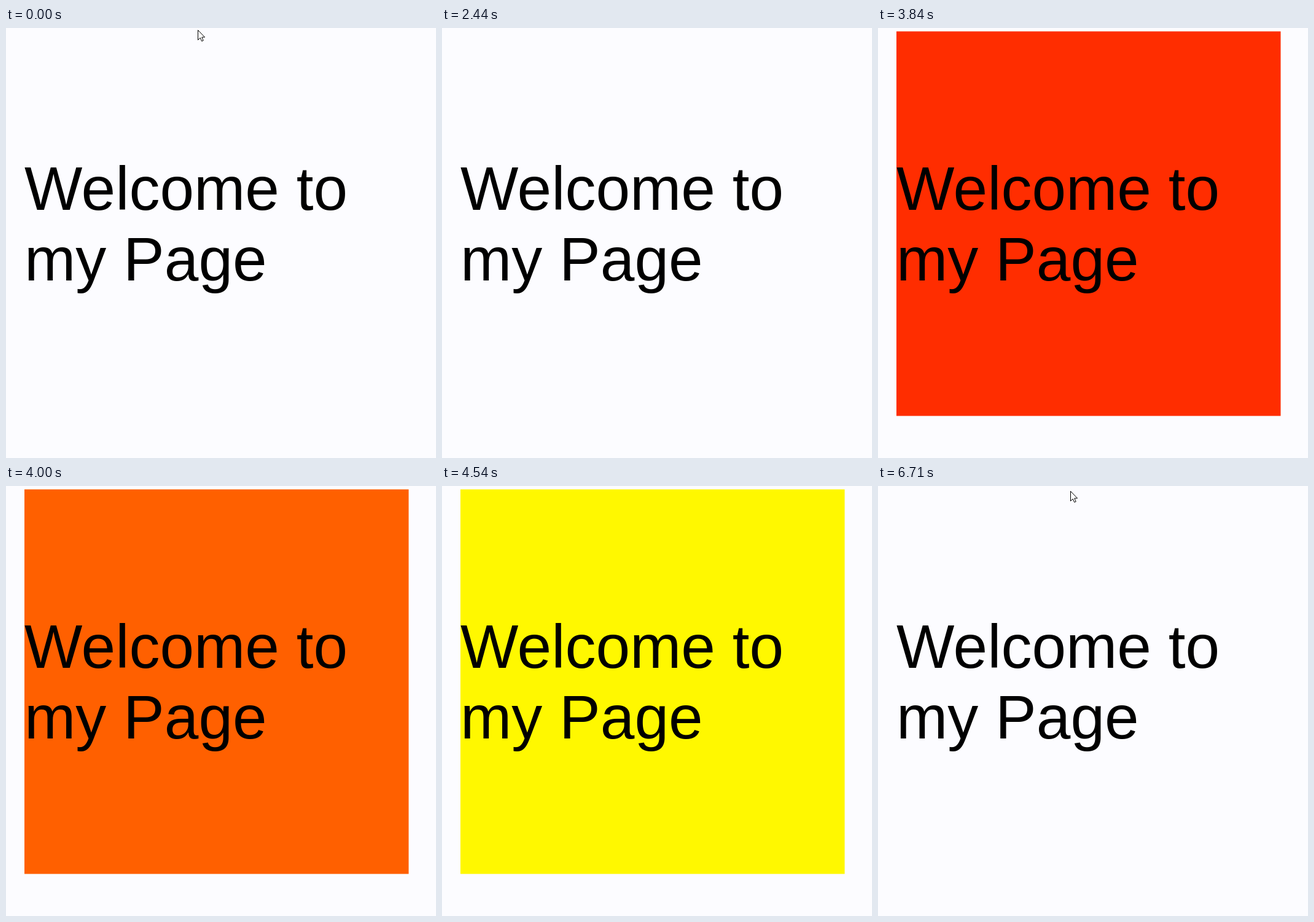
An HTML page for the animation above (6950 ms loop, 700 px wide and 700 px high).

```html
<!DOCTYPE html>
<html lang="en">
<head>
<meta charset="utf-8">
<title>Welcome</title>
<style>
  html, body { margin: 0; width: 100%; height: 100%; overflow: hidden; background: #fcfcff; }
  svg { display: block; width: 100%; height: 100%; }
  text { font: 100px "Liberation Sans", Arial, sans-serif; }
</style>
</head>
<body>
<svg viewBox="0 0 700 700">
  <rect id="box" x="30" y="5.5" width="625.5" height="626" visibility="hidden"/>
  <text x="30" y="296">Welcome to</text>
  <text x="30" y="411">my Page</text>
  <path id="cursor" d="M.5 .5V16.5L4.2 13L6.7 18.5L9.2 17.4L6.8 12H11.6Z"
        fill="#fff" stroke="#000" stroke-width="1"/>
</svg>
<script>
const LOOP = 6950, TICK = 1000 / 30;
const BOX_ON = 3566, BOX_OFF = 5566;
const LEAVE = 740, GONE = 1366, RETURN = 6160, REST = 6700;
const box = document.getElementById("box");
const cursor = document.getElementById("cursor");

const progress = (t, from, to) => Math.min(1, Math.max(0, (t - from) / (to - from)));
const mix = (a, b, k) => a + (b - a) * k;
const easeInOut = p => p * p * (3 - 2 * p);
const easeOut = p => 1 - (1 - p) ** 3;
// Overshoots the end by c-dependent amount, then settles
const easeBack = (p, c = 2.77) => 1 + (c + 1) * (p - 1) ** 3 + c * (p - 1) ** 2;

function show(el, on) {
  el.setAttribute("visibility", on ? "visible" : "hidden");
}

function cursorAt(t) {
  if (t < GONE) {
    const p = progress(t, LEAVE, GONE);
    return [mix(312, 702, p ** 1.6), mix(3, 105, p ** 1.3)];
  }
  const p = progress(t, RETURN, REST);
  return [mix(661, 313, easeBack(p)), mix(127, 8, easeOut(p))];
}

function draw(now) {
  const t = Math.floor((now % LOOP) / TICK) * TICK;

  const green = Math.round(255 * easeInOut(progress(t, 3540, 4640)));
  box.setAttribute("fill", `rgb(255,${green},0)`);
  show(box, t >= BOX_ON && t < BOX_OFF);

  cursor.setAttribute("transform", `translate(${cursorAt(t).map(Math.round)})`);
  show(cursor, t < GONE || t >= RETURN);
}

const start = performance.now();
function frame() {
  draw(performance.now() - start);
  requestAnimationFrame(frame);
}
frame();
</script>
</body>
</html>
```
